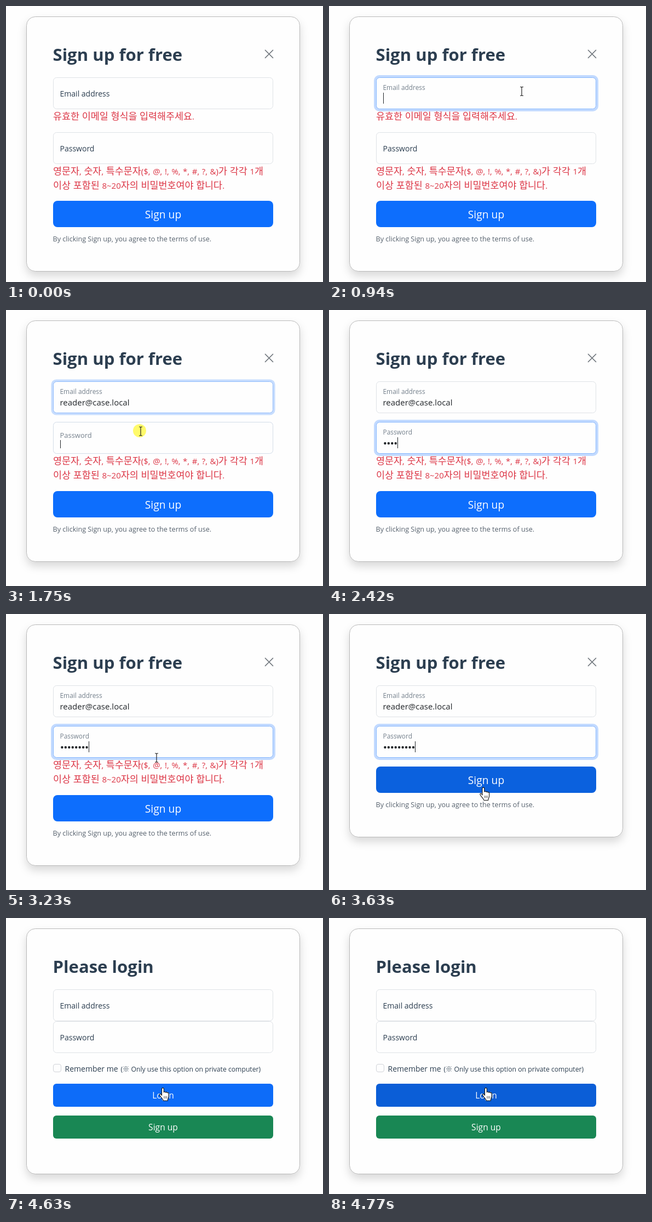
Write an HTML page that moves like this. It is 579 px wide and 503 px high and loops after 5030 ms.

```html
<!DOCTYPE html>
<html lang="ko">
<head>
<meta charset="utf-8">
<title>Sign up form</title>
<style>
  html, body { margin: 0; width: 100%; height: 100%; overflow: hidden; background: #fefefe; }
  svg { display: block; }
  text { font-family: "Open Sans", "Noto Sans CJK KR", "Noto Sans CJK", "Noto Sans", sans-serif; white-space: pre; }
</style>
</head>
<body>
<svg width="579" height="503" viewBox="0 0 579 503">
  <defs>
    <filter id="shadow" x="-10%" y="-10%" width="120%" height="125%">
      <feDropShadow dx="0" dy="8" stdDeviation="8" flood-opacity=".15"/>
    </filter>
  </defs>
  <g id="view"></g>
</svg>
<script>
const LOOP = 5030;
const EMAIL = 'reader@case.local';
const INK = '#2c3e50', BODY = '#212529';
const BLUE = [13, 110, 253], BLUE_HOVER = [11, 94, 215], BLUE_ACTIVE = [10, 88, 202];

const TICKS = [0, 130, 200, 270, 330, 400, 470, 800, 870, 940, 1260, 1330, 1400, 1480, 1550,
  1690, 1750, 1820, 1960, 2020, 2090, 2160, 2420, 2560, 2690, 2760, 2880,
  3030, 3100, 3160, 3230, 3370, 3440, 3500, 3560, 3630, 3700, 3830,
  3900, 3960, 4030, 4100, 4630, 4700, 4770];
const TYPED = [[1260, 1], [1330, 5], [1400, 9], [1480, 14], [1550, 17]];
const DOTS = [[2020, 1], [2090, 2], [2160, 3], [2420, 4], [2560, 5], [2690, 6], [2760, 7], [2880, 8], [3370, 9]];
const POINTER = [
  [130, 'arrow', 522, 448], [200, 'arrow', 503, 418], [270, 'hand', 468, 365],
  [330, 'beam', 405, 252], [400, 'beam', 362, 175], [470, 'beam', 352, 155.5], [1260, ''],
  [1690, 'beam', 246, 221], [2020, ''],
  [3030, 'beam', 246, 221], [3100, 'beam', 255, 234], [3160, 'beam', 268, 252], [3230, 'beam', 275, 262], [3370, ''],
  [3500, 'arrow', 278, 268], [3560, 'hand', 280, 300], [3630, 'hand', 282, 316.5],
  [3700, 'hand', 285, 312], [3830, 'hand', 286.5, 310]
];
const CLICKS = [[800, 940], [1690, 1820], [3900, 4030]];

const last = (keys, t) => keys.filter(k => k[0] <= t).pop() || [0, 0];
const ramp = (t, start, length = 150) => {
  const p = Math.min(1, Math.max(0, (t - start) / length));
  return p * p * (3 - 2 * p);
};
const mix = (a, b, p) => a + (b - a) * p;
const blend = (a, b, p) => `rgb(${a.map((v, i) => Math.round(mix(v, b[i], p)))})`;

const pen = document.createElement('canvas').getContext('2d');
const widthOf = (s, size) => {
  pen.font = `${size}px "Open Sans", sans-serif`;
  return pen.measureText(s).width;
};

const text = (s, x, y, size, fill = INK, more = '') =>
  `<text x="${x}" y="${y}" font-size="${size}" fill="${fill}" ${more}>${s}</text>`;

const box = (x, y, w, h, r, fill, more = '') =>
  `<rect x="${x}" y="${y}" width="${w}" height="${h}" rx="${r}" fill="${fill}" ${more}/>`;

const card = bottom =>
  box(37.5, 19.5, 499, bottom - 20, 16, '#fefefe', 'stroke="#b9b9b9" filter="url(#shadow)"');

const title = s => text(s, 85.5, 100, 31.1, INK, 'font-weight="700"');

const button = (y, h, label, size, fill) =>
  box(86, y, 402, h, h > 45 ? 8 : 6, fill) +
  text(label, 287, y + h / 2 + size * .41, size, '#fff', 'text-anchor="middle"');

// focus and float run from 0 to 1
function field(y, label, focus = 0, float = 0) {
  const s = 4 * focus;
  return (focus ? box(86 - s, y - s, 402 + 2 * s, 58 + 2 * s, 6 + s, `rgba(13,110,253,${.25 * focus})`) : '') +
    box(86.5, y + .5, 401, 57, 6, '#fefefe', `stroke="${blend([222, 226, 230], [134, 183, 254], focus)}"`) +
    text(label, 98.5, y + mix(35, 23, float), mix(14, 11.9, float), INK, `opacity="${float ? .65 : 1}"`);
}

// The caret grows as the label floats out of its way.
const caret = (x, y, float) => {
  const h = mix(10, 20, float);
  return box(Math.round(x), y + 48 - h, 1, h, 0, BODY);
};

// Hangul is larger and lighter than the Latin parts.
const warning = (s, y) => text(
  s.replace(/[^가-힣]+/g, m => `<tspan font-size="15" font-weight="400">${m}</tspan>`),
  86, y, 17.4, '#dc3545', 'font-weight="300" word-spacing=".8"');

const SHAPES = {
  arrow: '<path d="M0 0V16L4 12.5 6.5 18.5 9 17.5 6.5 11.7H11.5Z" fill="#fff" stroke="#111"/>',
  beam: '<path d="M-3-8H-1L0-7 1-8H3M0-7V7M-3 8H-1L0 7 1 8H3" fill="none" stroke="#222" stroke-width="1.2"/>',
  hand: '<path d="M-2 13V1.5a1.9 1.9 0 0 1 3.8 0V8c0-1.8 3.4-1.8 3.4.4c0-1.6 3-1.4 3 .7c.4-1.3 2.5-1 2.5.9V15' +
    'c0 3-2 4.5-2 8H1c-.5-3-5-6-7-10.5c-.6-1.6 1.6-2.6 2.6-1.2Z" fill="#fff" stroke="#111" stroke-width="1.1"/>' +
    '<path d="M2.4 14.5V19M4.8 14.5V19M7.2 14.5V19" stroke="#333" stroke-width=".8"/>'
};

function pointer(t) {
  const [, kind, x, y] = last(POINTER, t);
  if (!kind) return '';
  const clicked = CLICKS.some(([from, to]) => t >= from && t < to);
  return (clicked ? `<circle cx="${x - 2}" cy="${y - 1}" r="12" fill="#fff950" opacity=".85"/>` : '') +
    `<g transform="translate(${x} ${y})">${SHAPES[kind]}</g>`;
}

function signUp(t) {
  const typed = last(TYPED, t)[1], dots = last(DOTS, t)[1];
  const badEmail = typed < 14, badPass = dots < 9;
  const passY = badEmail ? 230 : 204;
  const buttonY = 278 + Math.ceil(25.6 * (badEmail + 2 * badPass));
  const emailFocus = ramp(t, 780) - ramp(t, 1720);
  const passFocus = ramp(t, 1720) - ramp(t, 3890);
  const emailFloat = ramp(t, 780, 100), passFloat = ramp(t, 1700, 100);
  const hover = ramp(t, 210) - ramp(t, 290, 100) + ramp(t, 3520);
  const pressed = t >= 3900 && t < 4030;

  let s = card(buttonY + 129) + title('Sign up for free') +
    '<path d="M473.5 80.5L487.5 94.5M487.5 80.5L473.5 94.5" stroke="#6f757c" stroke-width="1.7" stroke-linecap="round"/>' +
    field(130, 'Email address', emailFocus, emailFloat) +
    field(passY, 'Password', passFocus, passFloat);

  const value = EMAIL.slice(0, typed);
  s += text(value, 98.5, 174, 15, BODY);
  for (let i = 0; i < dots; i++)
    s += `<circle cx="${102.4 + 6.45 * i}" cy="${passY + 39}" r="2.2" fill="${BODY}"/>`;
  if (t >= 800 && t < 1750) s += caret(99 + widthOf(value, 15), 130, emailFloat);
  if (t >= 1750 && t < 3900) s += caret(99 + 6.45 * dots, passY, passFloat);

  if (badEmail) s += warning('유효한 이메일 형식을 입력해주세요.', 207);
  if (badPass) s +=
    warning('영문자, 숫자, 특수문자($, @, !, %, *, #, ?, &amp;)가 각각 1개', passY + 77) +
    warning('이상 포함된 8~20자의 비밀번호여야 합니다.', passY + 103);

  return s +
    button(buttonY, 48, 'Sign up', 19.3, blend(BLUE, pressed ? BLUE_ACTIVE : BLUE_HOVER, hover)) +
    text('By clicking Sign up, you agree to the terms of use.', 85.5, buttonY + 74, 12.6, '#56616d');
}

function login(t) {
  return card(467) + title('Please login') +
    field(130, 'Email address') + field(188, 'Password') +
    box(86.5, 266.5, 14, 14, 3.5, '#fefefe', 'stroke="#d0d3d8"') +
    text('Remember me', 107.5, 280, 14) +
    text('(※ Only use this option on private computer)', 209.5, 280, 12.2) +
    button(302, 42, 'Login', 15.6, blend(BLUE, BLUE_HOVER, ramp(t, 4600))) +
    button(360, 42, 'Sign up', 15.6, '#198754');
}

const view = document.getElementById('view');
const start = performance.now();
let shown = -1;

function draw() {
  const now = (performance.now() - start) % LOOP;
  const t = TICKS.filter(k => k <= now).pop();
  if (t !== shown) {
    shown = t;
    view.innerHTML = (t < 4630 ? signUp(t) : login(t)) + pointer(t);
  }
  requestAnimationFrame(draw);
}
draw();
</script>
</body>
</html>
```
